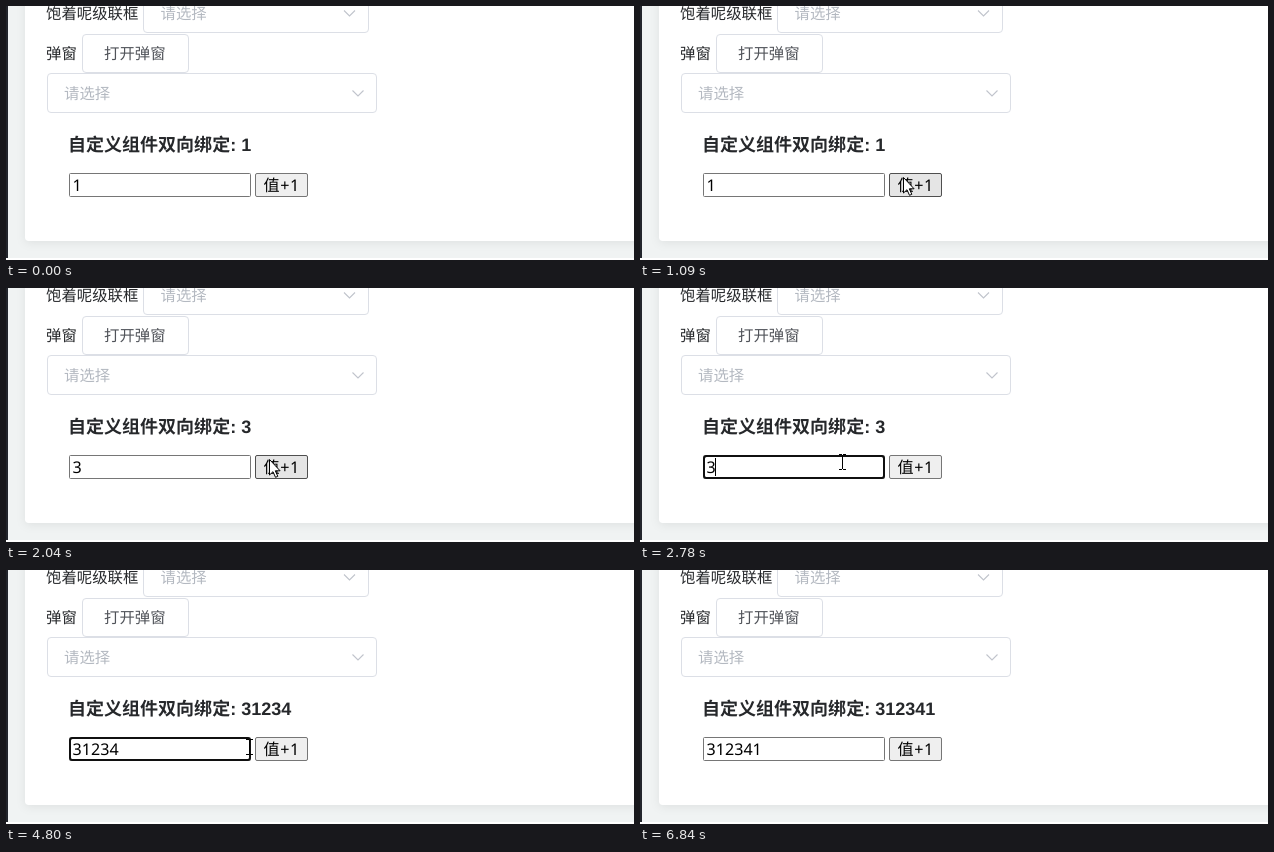
Recreate the animation shown at these times as an HTML page. Size 628 by 254 pixels, loop 8.29 s.

```html
<!DOCTYPE html>
<html lang="zh-CN">
<head>
<meta charset="utf-8">
<title>双向绑定</title>
<style>
  html, body { margin: 0; width: 100%; height: 100%; overflow: hidden; background: #fff; }
  svg { display: block; width: 628px; height: 254px; }
  text { font: 15.4px "Noto Sans CJK SC", "Noto Sans CJK", sans-serif; fill: #26282b; text-rendering: geometricPrecision; white-space: pre; }
  .hint { fill: #b4b9c1; }
  .soft { fill: #505359; }
  .box { fill: #fff; stroke: #dcdfe6; }
  .chevron { fill: none; stroke: #c0c4cc; stroke-width: 1.1; }
  .title { font: bold 18.02px "Liberation Sans", "Noto Sans CJK SC", "Noto Sans CJK", sans-serif; }
  .field { font: 16.1px "Noto Sans", "Noto Sans CJK SC", "Noto Sans CJK", sans-serif; fill: #000; }
  .spaced { letter-spacing: .6px; }
  .card { filter: drop-shadow(0 2px 5px rgba(0, 0, 0, .07)); }
  #ring { fill: #fff; stroke: #101010; stroke-width: 2; }
  #btn { fill: #efefef; stroke: #767676; }
  #btn.hover { fill: #e5e5e5; stroke: #4f4f4f; }
  #btn.press { fill: #f5f5f5; stroke: #8d8d8d; }
</style>
</head>
<body>
<svg viewBox="0 0 628 254">
  <rect width="628" height="252" fill="#f0f3f3"/>
  <rect width="2" height="252" fill="#22252c"/>
  <rect class="card" x="19" y="-20" width="640" height="255" rx="4" fill="#fff"/>

  <text x="40" y="13">饱着呢级联框</text>
  <rect class="box" x="137.5" y="-13.5" width="225" height="40" rx="3.5"/>
  <text class="hint" x="154.5" y="13">请选择</text>
  <path class="chevron" d="M338 4.5l5.500 5.500 5.500-5.500"/>

  <text x="40" y="53">弹窗</text>
  <rect class="box" x="76.5" y="28.5" width="106" height="38" rx="3.5"/>
  <text class="soft" x="98" y="53">打开弹窗</text>

  <rect class="box" x="41.5" y="67.5" width="329" height="39" rx="3.5"/>
  <text class="hint" x="58" y="93">请选择</text>
  <path class="chevron" d="M346.5 84.5l5.500 5.500 5.500-5.500"/>

  <text class="title" x="62" y="145">自定义组件双向绑定: <tspan id="bound">1</tspan></text>

  <rect x="63.5" y="167.5" width="181" height="23" rx="1" fill="#fff" stroke="#767676"/>
  <rect id="ring" x="64" y="168" width="180" height="22" rx="2.5"/>
  <text id="value" class="field" x="66.6" y="184.5">1</text>
  <rect id="caret" y="170" width="1" height="18"/>

  <rect id="btn" x="249.5" y="167.5" width="52" height="23" rx="1.5"/>
  <text class="field spaced" x="257.5" y="184.5">值+1</text>

  <path id="arrow" d="M.5.5v15.500l3.500-3.300 2.500 5.600 2.300-1-2.500-5.500h4.800z" fill="#fff" stroke="#000"/>
  <path id="beam" d="M-3-7.500h3m1 0h3M-3 7.500h3m1 0h3M.5-7V7" fill="none" stroke="#000"/>
</svg>
<script>
const LOOP = 8290, STEP = 69, BLINK = 535, PRESS = 70;
const ENTER = 260, LEAVE = 6840, FOCUS = 2660, BLUR = 6020;
const $ = id => document.getElementById(id);
const [bound, value, ring, caret, btn, arrow, beam] =
  ['bound', 'value', 'ring', 'caret', 'btn', 'arrow', 'beam'].map($);

const clicks = [1300, 1970, BLUR];
const keys = [...'1234'].map((key, i) => ({ key, at: 3460 + 110 * i + 30 * i * i }));

// Pointer moves: start time, duration, where it comes to rest
const moves = [
  [ENTER, 800, 263, 171],
  [2480, 100, 240, 159],
  [2580, 200, 202, 174],
  [3030, 160, 207, 174],
  [4550, 250, 243, 177],
  [5050, 240, 267, 184],
  [6500, 340, 478, 228]
];

function pointerAt(t) {
  if (t < ENTER || t >= LEAVE) return null;
  const tick = Math.ceil(t / STEP) * STEP;
  let x = 414, y = 240;
  for (const [start, span, toX, toY] of moves) {
    const s = Math.min(1, Math.max(0, (tick - start) / span));
    const ease = s * s * (3 - 2 * s);
    x += (toX - x) * ease;
    y += (toY - y) * ease;
  }
  return [Math.round(x), Math.round(y)];
}

// Typing turns the number into a string, so the last +1 appends a digit
function valueAt(t) {
  const edits = [
    ...clicks.map(at => ({ at: at + PRESS, run: v => v + 1 })),
    ...keys.map(({ at, key }) => ({ at, run: v => v + key }))
  ];
  return String(edits.filter(e => e.at <= t)
    .sort((a, b) => a.at - b.at)
    .reduce((v, e) => e.run(v), 1));
}

function caretOn(t) {
  const last = keys.reduce((from, { at }) => at <= t ? at : from, FOCUS);
  return Math.floor((t - last) / BLINK) % 2 === 0;
}

const inside = (p, x, y, w, h) => p && p[0] >= x && p[0] < x + w && p[1] >= y && p[1] < y + h;
const show = (el, on) => el.setAttribute('visibility', on ? 'visible' : 'hidden');

function draw(now) {
  const t = now % LOOP;
  const text = valueAt(t), p = pointerAt(t);
  if (value.textContent !== text) value.textContent = bound.textContent = text;

  const focused = t >= FOCUS && t < BLUR;
  show(ring, focused);
  show(caret, focused && caretOn(t));
  caret.setAttribute('x', Math.floor(66.3 + 9.22 * text.length));

  const pressed = clicks.some(at => t >= at && t < at + PRESS);
  const hover = inside(p, 249, 167, 53, 24);
  btn.setAttribute('class', pressed ? 'press' : hover ? 'hover' : '');

  const typing = inside(p, 63, 167, 182, 24);
  show(arrow, p && !typing);
  show(beam, typing);
  if (p) (typing ? beam : arrow).setAttribute('transform', `translate(${p})`);
}

function tick(now) {
  draw(now);
  requestAnimationFrame(tick);
}
draw(0);
requestAnimationFrame(tick);
</script>
</body>
</html>
```
